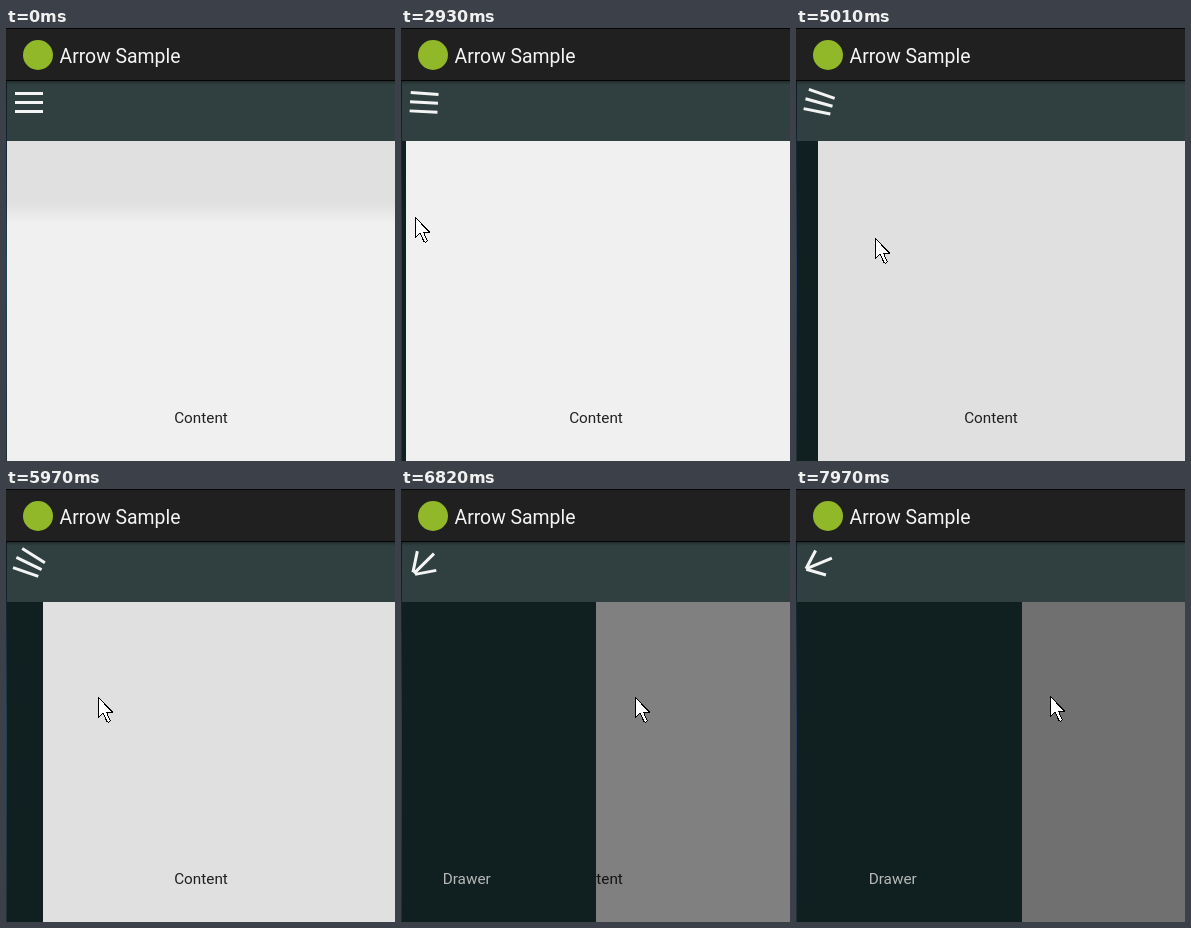
An HTML page for the animation above (8000 ms loop, 389x433 px).

```html
<!DOCTYPE html>
<html lang="en">
<head>
<meta charset="utf-8">
<title>Arrow Sample</title>
<style>
  html, body { margin: 0; width: 100%; height: 100%; overflow: hidden; background: #202020; }
  svg { display: block; width: 389px; height: 433px; }
  text { font-family: Roboto, "Open Sans", sans-serif; font-size: 15.3px; }
</style>
</head>
<body>
<svg viewBox="0 0 389 433">
  <defs>
    <linearGradient id="fade" gradientUnits="userSpaceOnUse" x1="0" y1="174" x2="0" y2="196">
      <stop offset="0" stop-color="#e0e0e0"/>
      <stop offset="1" stop-color="#f0f0f0"/>
    </linearGradient>
    <linearGradient id="shade" x1="0" y1="0" x2="0" y2="1">
      <stop offset="0" stop-color="#000" stop-opacity=".3"/>
      <stop offset="1" stop-color="#000" stop-opacity="0"/>
    </linearGradient>
    <linearGradient id="desk" x1="0" y1="0" x2="0" y2="1">
      <stop offset="0" stop-color="#101820"/>
      <stop offset=".5" stop-color="#20405a"/>
      <stop offset="1" stop-color="#203038"/>
    </linearGradient>
  </defs>

  <rect id="content" y="113" width="389" height="320"/>
  <text id="label" x="195" y="394.5" text-anchor="middle">Content</text>

  <g id="drawer">
    <rect x="-259" y="113" width="259" height="320" fill="#102020"/>
    <text x="-129.3" y="394.5" text-anchor="middle" fill="#b8b8b8">Drawer</text>
  </g>

  <rect y="53" width="389" height="60" fill="#304040"/>
  <rect y="53" width="389" height="4" fill="url(#shade)"/>
  <path id="icon" fill="none" stroke="#f4f4f4" stroke-width="3"/>

  <rect width="389" height="53" fill="#202020"/>
  <path d="M0 .5H389M0 52.5H389" stroke="#050505"/>
  <circle cx="32" cy="27" r="15" fill="#90b828"/>
  <text x="53.5" y="34.5" fill="#f4f4f4" style="font-size:19.4px">Arrow Sample</text>

  <rect y="53" width="1" height="380" fill="url(#desk)"/>
  <path id="cursor" shape-rendering="crispEdges" fill="#fff" stroke="#000"
    d="M.5 .5V20.5L5 16L9 24.5Q10.5 26 12.3 24L8.5 15.2H14.5Z"/>
</svg>
<script>
const LOOP = 8000, WIDTH = 259, ENTER = 1110;
const $ = id => document.getElementById(id);

// The picture advances every 100 ms, counted anew from each of these times.
const starts = [ENTER, 2730, 3560, 5010, 6120, 7870];

// Turning points of the pointer: time, x, y
const pointer = [
  [ENTER, 380, 256], [1910, 56, 185], [2730, 14, 181], [3100, 14, 196],
  [4510, 149, 219], [5180, 66, 208], [5460, 66, 208], [7480, 287, 208],
  [8100, 250, 207]
];

// Drawer: peek, drag open, drag back: time, right edge
const edges = [[2830, 0], [3130, 22], [5607, 22], [7465, WIDTH], [8100, 222]];

// Eased value of one column between turning points.
function sample(keys, t, col) {
  const i = keys.findIndex(k => k[0] > t);
  if (i === 0) return keys[0][col];
  const a = keys[i - 1], b = keys[i];
  const k = (t - a[0]) / (b[0] - a[0]);
  return Math.round(a[col] + (b[col] - a[col]) * (1 - Math.cos(Math.PI * k)) / 2);
}

function snap(t) {
  const start = starts.filter(s => s <= t).pop() || 0;
  return start + Math.floor((t - start) / 100) * 100;
}

// Three bars that fold into an arrow while the whole turns half round.
function iconPath(p) {
  const mix = (a, b) => a + (b - a) * p;
  const half = 14, gap = mix(9, -1), size = mix(2 * half, 19.5), angle = mix(0, Math.PI / 4);
  const dx = -size * Math.cos(angle), dy = size * Math.sin(angle);
  return `M${half} ${-gap}l${dx} ${-dy}M${-half} 0H${half}M${half} ${gap}l${dx} ${dy}`;
}

function draw(time) {
  const t = snap(time);
  const edge = sample(edges, t, 1), p = edge / WIDTH;
  const light = 1 - 0.6 * p;
  const grey = v => `rgb(${v},${v},${v})`;

  $("content").setAttribute("fill", p ? grey(Math.round(15 * light) * 16) : "url(#fade)");
  $("label").setAttribute("fill", grey(Math.round(34 * light)));
  $("drawer").setAttribute("transform", `translate(${edge} 0)`);
  $("icon").setAttribute("d", iconPath(p));
  $("icon").setAttribute("transform", `translate(23 74.5) rotate(${180 * p})`);

  const x = sample(pointer, t, 1), y = sample(pointer, t, 2);
  $("cursor").setAttribute("transform", `translate(${x} ${y})`);
  $("cursor").setAttribute("visibility", t < ENTER ? "hidden" : "visible");
}

const began = performance.now();
function tick() {
  draw((performance.now() - began) % LOOP);
  requestAnimationFrame(tick);
}
tick();
</script>
</body>
</html>
```
